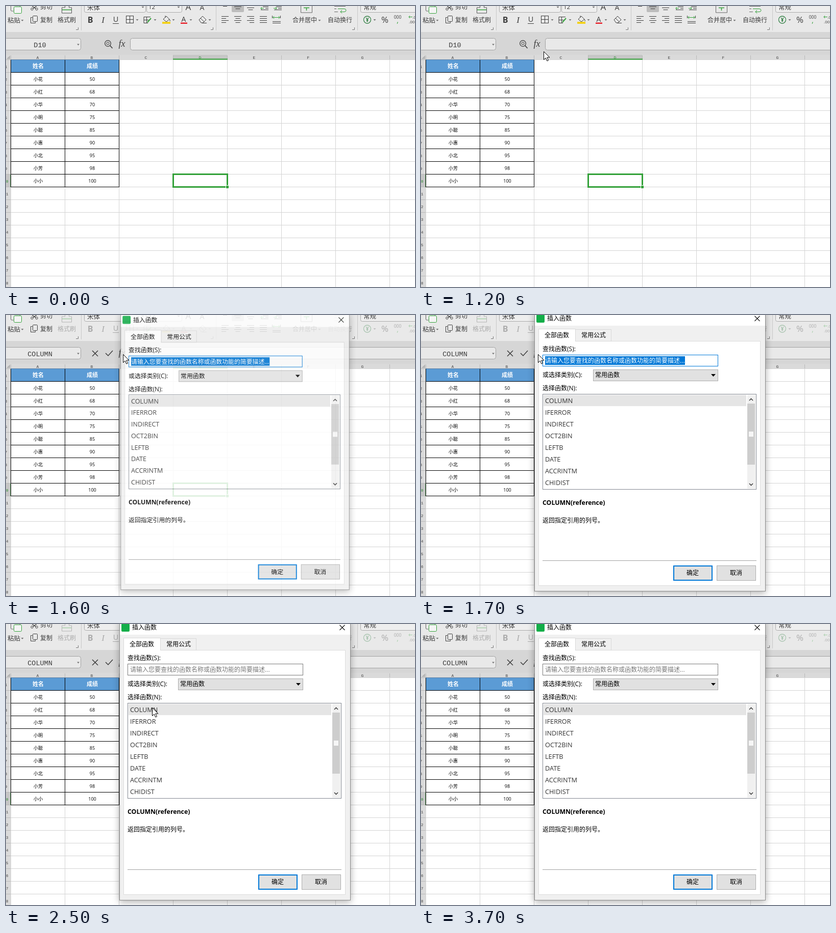
Write an HTML page that moves like this. It is 801 by 552 pixels and loops after 4000 ms.

```html
<!DOCTYPE html>
<html lang="zh-CN">
<head>
<meta charset="utf-8">
<title>插入函数</title>
<style>
html, body { margin: 0; width: 100%; height: 100%; overflow: hidden; background: #fff; }
svg { display: block; width: 801px; height: 552px; }
text { font-family: 'Open Sans', 'Noto Sans CJK SC', 'Noto Sans CJK', sans-serif; white-space: pre; }
.mono { font-family: 'Liberation Mono', 'Noto Sans CJK SC', monospace; }
.serif { font-family: 'Liberation Serif', 'Noto Serif', serif; font-style: italic; }
#dialog { filter: drop-shadow(0 3px 7px rgba(0, 0, 0, .32)); }
</style>
</head>
<body>
<svg id="stage" viewBox="0 0 801 552"></svg>
<script>
const GREEN = '#33a139', BLUE = '#0078d7', INK = '#3c3c3c';

const rect = (x, y, w, h, fill, more = '') =>
  `<rect x="${x}" y="${y}" width="${w}" height="${h}" fill="${fill}" ${more}/>`;
const box = (x, y, w, h, fill, stroke, more = '') =>
  rect(x + .5, y + .5, w - 1, h - 1, fill, `stroke="${stroke}" ${more}`);
const line = (d, color = INK, width = 1, fill = 'none', more = '') =>
  `<path d="${d}" stroke="${color}" stroke-width="${width}" fill="${fill}" ${more}/>`;
const shape = (d, fill) => `<path d="${d}" fill="${fill}"/>`;
// y is the middle of the glyphs
const text = (s, x, y, size = 12, fill = '#000', more = '') =>
  `<text x="${x}" y="${y + size * .37}" font-size="${size}" fill="${fill}" ${more}>${s}</text>`;
const mid = (s, x, y, size, fill, more = '') =>
  text(s, x, y, size, fill, 'text-anchor="middle" ' + more);
const group = (id, body, more = '') => `<g id="${id}" ${more}>${body}</g>`;
const drop = (x, y) => shape(`M${x - 2.5} ${y - 1}h5l-2.5 3z`, '#777');
const corner = x => line(`M${x} 46.5h4.5v-4.5`, '#777');
const range = (n, f) => Array.from({ length: n }, (_, i) => f(i)).join('');

function sheet() {
  const names = ['小花', '小红', '小华', '小明', '小聪', '小惠', '小北', '小芳', '小小'];
  const marks = [50, 68, 70, 75, 85, 90, 95, 98, 100];
  const bold = 'font-weight="bold"';
  return rect(0, 96, 801, 9, '#dadada') + rect(0, 105, 9, 447, '#dadada') +
    rect(327, 96, 106, 9, '#c6c6c6') + rect(0, 331, 9, 25, '#c6c6c6') +
    shape('M8 97v7h-7z', '#b4b4b4') +
    range(8, i => line(`M${9.5 + 106 * i} 97v8`, '#b8b8b8') +
      line(`M${9.5 + 106 * i} 105v447`, '#d4d4d4')) +
    range(18, i => line(`M0 ${105.5 + 25 * i}h9`, '#b8b8b8') +
      line(`M9 ${105.5 + 25 * i}h792`, '#d4d4d4')) +
    range(7, i => mid('ABCDEFG'[i], 62 + 106 * i, 101, 8, i == 3 ? '#2a8a30' : '#444', 'class="mono"')) +
    range(18, i => mid(i + 1, 0, 119 + 25 * i, 7.5, i == 9 ? '#2a8a30' : '#444', 'class="mono"')) +
    rect(327, 103.5, 107, 2, GREEN) + rect(8.5, 331, 1.5, 25, GREEN) +
    rect(10, 106, 211, 24, '#5b9bd5') +
    mid('姓名', 63, 118, 11, '#fff', bold) + mid('成绩', 169, 118, 11, '#fff', bold) +
    range(9, i => mid(names[i], 63, 143.5 + 25 * i, 9) + mid(marks[i], 169, 143.5 + 25 * i, 9)) +
    range(11, i => line(`M9 ${105.5 + 25 * i}h213`, i ? '#000' : '#5b7fa5')) +
    range(3, i => line(`M${9.5 + 106 * i} 106v250`, '#000')) +
    rect(327.5, 330.5, 106, 25, 'none', `stroke="${GREEN}" stroke-width="3"`) +
    rect(430, 352, 6, 6, '#fff') + rect(431, 353, 5, 5, GREEN);
}

function bars(x, ys, ws, align = .5) {
  return ys.map((y, i) => line(`M${x + (14 - ws[i]) * align} ${y}h${ws[i]}`)).join('');
}

function ribbon() {
  const rows = [20.5, 24.5, 28.5, 32.5], alt = [14, 9, 14, 9];
  const clip = line('M9.500 0v8q0 2 2 2h3M27.500 0v2', '#666') +
    box(15, 1, 16, 14, '#f4f4f4', GREEN, 'rx="2"');
  const copy = line('M51.500 22.500h-3v11h9v-2') + box(52, 19, 10, 12, 'none', INK, 'rx="1"');
  const cut = line('M51 0l7 5M60 0l-7 5', INK, 1.2) +
    range(2, i => `<circle cx="${51 + 9 * i}" cy="6" r="2.200" stroke="${INK}" fill="none"/>`);
  const brush = line('M115.500 0v3h-6v11h19v-11h-5v-3', '#555') + line('M110 7.500h18', GREEN, 1.5);

  const fontTools = mid('B', 165, 27, 16, INK, 'font-weight="bold"') +
    mid('I', 190, 27, 17, INK, 'class="serif"') + mid('U', 215, 26, 14.5, INK) +
    line('M209 34.500h12');
  const cellTools = box(235, 19, 15, 15, 'none', INK) + line('M242.500 19v15M235 26.500h15') + drop(257, 27) +
    line('M283 21.500h-13v12h8M270 27.500h9M275.500 22v11') +
    line('M277 32l7-8', GREEN, 2) + drop(292, 27) +
    line('M308 26l6-6 6 6-6 5zM312 19v4M320 26q2 3 1 4') + rect(306, 31, 16, 4, '#f3d21b') + drop(328, 27) +
    mid('A', 348, 25.5, 14, INK) + rect(342, 32.5, 13, 2.500, '#e8202a') + drop(362, 27) +
    line('M378 27l7-7 7 7-6 6h-4zM381 24l7 7M384 33.500h9') + drop(399, 27);

  const aligns = bars(422, [.5], [8]) + rect(442, -4, 24, 16, '#bcbcbc', 'rx="2"') +
    bars(447, [1.5, 5.5], [14, 9]) + bars(472, [3.5, 7.5], [14, 9]) +
    line('M503 1.500h11M508 4.500h6M499 7.500h15M529 1.500h11M533 4.500h7M525 7.500h15') +
    line('M505 4.500h-6M501 2l-2 2.500 2 2.500M524 4.500h6M528 2l2 2.500-2 2.500', GREEN) +
    bars(422, rows, alt, 0) + bars(447, rows, alt) + bars(472, rows, alt, 1) +
    bars(497, rows, [14, 14, 14, 14]) +
    line('M521.500 19v5M537.500 19v5M522 30.500h16M522 33.500h16') +
    line('M523 22.500h13M525 20l-2 2.500 2 2.500M534 20l2 2.500-2 2.500', GREEN);
  const merge = line('M577.500 0v13h22v-13', '#666') + line('M583 3.500h11M588.500 3v6', GREEN, 1.5) +
    text('合并居中', 561, 28, 12, INK) + drop(614, 28);
  const wrap = line('M643 .500h22M643 5.500h4M643 11.500h7', '#666') +
    line('M650 5.500h12q4 0 4 3t-4 3h-7M658 8l-3 3.500 3 3', GREEN) +
    text('自动换行', 630, 28, 12, INK);
  const number = `<circle cx="707.500" cy="27" r="7" fill="none" stroke="#38834a" stroke-width="1.300"/>` +
    mid('¥', 707.5, 27, 10, '#277a3a', 'font-weight="bold"') + drop(722, 27) +
    mid('%', 742, 27, 17, INK) + mid('000', 767, 22, 8.5, INK) + mid(',', 767, 28, 14, GREEN) +
    line('M796 21.500h-7M791 19l-2 2.500 2 2.500', GREEN) + text('.0', 796, 22, 8, INK) + text('.00', 789, 31, 8, INK);

  return rect(0, 0, 801, 51, '#e9e9e9') + rect(0, 51, 801, 45, '#d6d6d6') +
    [147.5, 411.5, 688.5].map(x => line(`M${x} 0v48`, '#c8c8c8')).join('') +
    clip + text('粘贴', 3, 28, 12.5, INK) + drop(32, 28) + cut + text('剪切', 67, 2, 12, INK) +
    copy + text('复制', 67, 28, 12, INK) +
    group('brush', brush + text('格式刷', 101, 28, 12, INK), 'class="tool"') + corner(137) +
    box(153, -12, 121, 25, '#eee', '#aaa', 'rx="3"') + text('宋体', 159, 3, 12.5, INK) + drop(268, 2) +
    box(275, -12, 70, 25, '#eee', '#aaa', 'rx="3"') + text('12', 279, 2, 11.5, INK) + drop(338, 2) +
    mid('A', 357, 2, 17, INK) + mid('A', 384, 2.5, 14, INK) +
    group('font', fontTools + cellTools, 'class="tool"') + corner(401) +
    aligns + merge + group('wrap', wrap, 'class="tool"') + corner(678) +
    box(694, -12, 120, 25, '#eee', '#aaa', 'rx="3"') + text('常规', 700, 2, 12.5, INK) +
    group('number', number, 'class="tool"');
}

function formulaBar() {
  return box(-4, 63, 151, 24, '#e9e9e9', '#a2a2a2', 'rx="4"') + drop(141.5, 75.5) +
    mid('', 66.5, 76, 13.5, INK, 'class="mono" id="cell"') +
    rect(215, 63, 24, 24, '#c3c3c3', 'id="fxBack" rx="3"') +
    group('idle', `<circle cx="199.500" cy="73.500" r="5.800" fill="none" stroke="${INK}" stroke-width="1.300"/>
      <circle cx="199.500" cy="73.500" r="2.500" fill="none" stroke="${INK}"/>` + line('M203.500 77.500l5 5.500', INK, 1.6)) +
    group('edit', line('M169 70l11 11M180 70l-11 11M195 75l5 5 9-10', INK, 1.5)) +
    mid('fx', 227, 73.5, 18, INK, 'class="serif"') +
    box(243, 63, 570, 24, '#e9e9e9', '#a2a2a2', 'rx="4"');
}

function dialog() {
  const list = ['COLUMN', 'IFERROR', 'INDIRECT', 'OCT2BIN', 'LEFTB', 'DATE', 'ACCRINTM', 'CHIDIST'];
  const body = box(230, 51, 435, 481, '#fff', '#dcdcdc') +
    box(302, 28, 71, 24, '#f0f0f0', '#d9d9d9') +
    line('M230.500 52v-24.500h72v24.500', '#d9d9d9', 1, '#fff') +
    text('全部函数', 242, 40) + text('常用公式', 314, 40) +
    text('查找函数(S):', 238, 67) + box(238, 78, 344, 23, '#fff', '#7a7a7a', 'id="field"') +
    rect(243, 81, 274, 17, BLUE, 'id="mark"') +
    text('请输入您要查找的函数名称或函数功能的简要描述...', 243, 89.5, 12, '#777', 'id="hint"') +
    text('或选择类别(C):', 238, 118) + box(337, 107, 245, 23, '#e1e1e1', '#adadad') +
    text('常用函数', 341, 118) + shape('M568 116h9l-4.500 5z', '#000') +
    text('选择函数(N):', 238, 144) + box(238, 155, 419, 188, '#fff', '#828790') +
    rect(240, 157, 397, 22, '#e5e5e5') +
    list.map((s, i) => text(s, 243, 168 + 23 * i, 12.7, '#333')).join('') +
    rect(639, 157, 16, 184, '#f0f0f0') + rect(639, 174, 15, 120, '#cdcdcd') +
    rect(642, 229, 9, 10, '#f6f6f6') +
    line('M643 168l3.500-3.500 3.500 3.500M643 331l3.500 3.500 3.500-3.500', '#444', 1.6) +
    text('COLUMN(reference)', 238, 368.5, 12.3, '#000', 'font-weight="bold"') +
    text('返回指定引用的列号。', 238, 403.5) + line('M238 482.500h419', '#a0a0a0') +
    rect(495, 493, 75, 28, '#e1e1e1', `id="ok" stroke="${BLUE}" stroke-width="2"`) + mid('确定', 532, 507) +
    box(579, 492, 77, 30, '#e1e1e1', '#adadad') + mid('取消', 617, 507);
  return group('dialog', box(222, -7, 453, 550, '#f0f0f0', '#8a8a8a') +
    rect(223, -6, 451, 27, '#fff') + rect(226, -1, 16, 16, '#13ae49', 'rx="2"') +
    text('插入函数', 247, 7) + line('M653.500 2l10 10M663.500 2l-10 10', '#111', 1.1) +
    group('body', body));
}

const cursors =
  group('cross', shape('M-3.500-7.500h7v4h4v7h-4v4h-7v-4h-4v-7h4z', '#000') +
    shape('M-2-6h4v4h4v4h-4v4h-4v-4h-4v-4h4z', '#fff')) +
  group('beam', line('M-3-8h2.500l.5.500.5-.5h2.500M0-7.500v15M-3 8h2.500l.5-.5.5.500h2.500', '#333', 1.2)) +
  group('arrow', line('M.500.500v16l3.700-3.500 2.700 6 2.600-1.200-2.700-5.800h5.200z', '#000', 1, '#fff'));

document.getElementById('stage').innerHTML =
  rect(0, 0, 801, 552, '#fff') + sheet() + ribbon() + formulaBar() + dialog() + cursors;

const $ = id => document.getElementById(id);
const show = (id, on) => $(id).setAttribute('display', on ? 'inline' : 'none');

// pointer way: time, x, y
const way = [
  [100, 629, 107], [200, 592, 148], [400, 468, 278], [500, 412, 328], [600, 394, 342], [700, 394, 342],
  [800, 336, 245], [900, 298, 180], [1100, 250, 100], [1300, 229, 77], [1700, 229, 77],
  [1900, 285, 90], [2000, 286, 132], [2100, 286, 164], [2600, 286, 164],
  [2700, 294, 182], [3000, 462, 424], [3100, 508, 482], [3200, 522, 500],
  [3300, 545, 490], [3600, 709, 412]
];

function pointer(t) {
  if (t < way[0][0] || t > way[way.length - 1][0]) return null;
  const i = Math.max(1, way.findIndex(p => p[0] >= t));
  const [a, x, y] = way[i - 1], [b, u, v] = way[i];
  const k = (t - a) / (b - a);
  return [x + (u - x) * k, y + (v - y) * k].map(Math.round);
}

function draw(time) {
  const t = Math.floor(time % 4000 / 100) * 100;
  const p = pointer(t), open = t >= 1600, focus = t < 2500;
  const within = (x, y, w, h) => p && p[0] >= x && p[0] < x + w && p[1] >= y && p[1] < y + h;

  $('cell').textContent = open ? 'COLUMN' : 'D10';
  show('idle', !open);
  show('edit', open);
  document.querySelectorAll('.tool').forEach(g => g.setAttribute('opacity', open ? .35 : 1));
  show('fxBack', !open && within(215, 63, 24, 24));
  $('fxBack').setAttribute('fill', t >= 1400 ? '#a5a5a5' : '#c3c3c3');

  const [alpha, scale] = t < 1600 ? [.35, .965] : t < 1700 ? [.85, .99] : [1, 1];
  show('dialog', t >= 1500);
  show('body', open);
  $('dialog').setAttribute('opacity', alpha);
  $('dialog').setAttribute('transform', `translate(448 268) scale(${scale}) translate(-448 -268)`);
  show('mark', focus);
  $('hint').setAttribute('fill', focus ? '#fff' : '#777');
  $('field').setAttribute('stroke', focus ? BLUE : '#7a7a7a');
  $('ok').setAttribute('fill', within(494, 492, 77, 30) ? '#e5f1fb' : '#e1e1e1');

  const kind = !p ? '' : t < 1500 && p[1] >= 105 ? 'cross' :
    open && within(239, 79, 342, 22) ? 'beam' : 'arrow';
  for (const id of ['cross', 'beam', 'arrow']) {
    show(id, id == kind);
    if (p) $(id).setAttribute('transform', `translate(${p})`);
  }
}

const start = performance.now();
function tick() {
  draw(performance.now() - start);
  requestAnimationFrame(tick);
}
tick();
</script>
</body>
</html>
```
